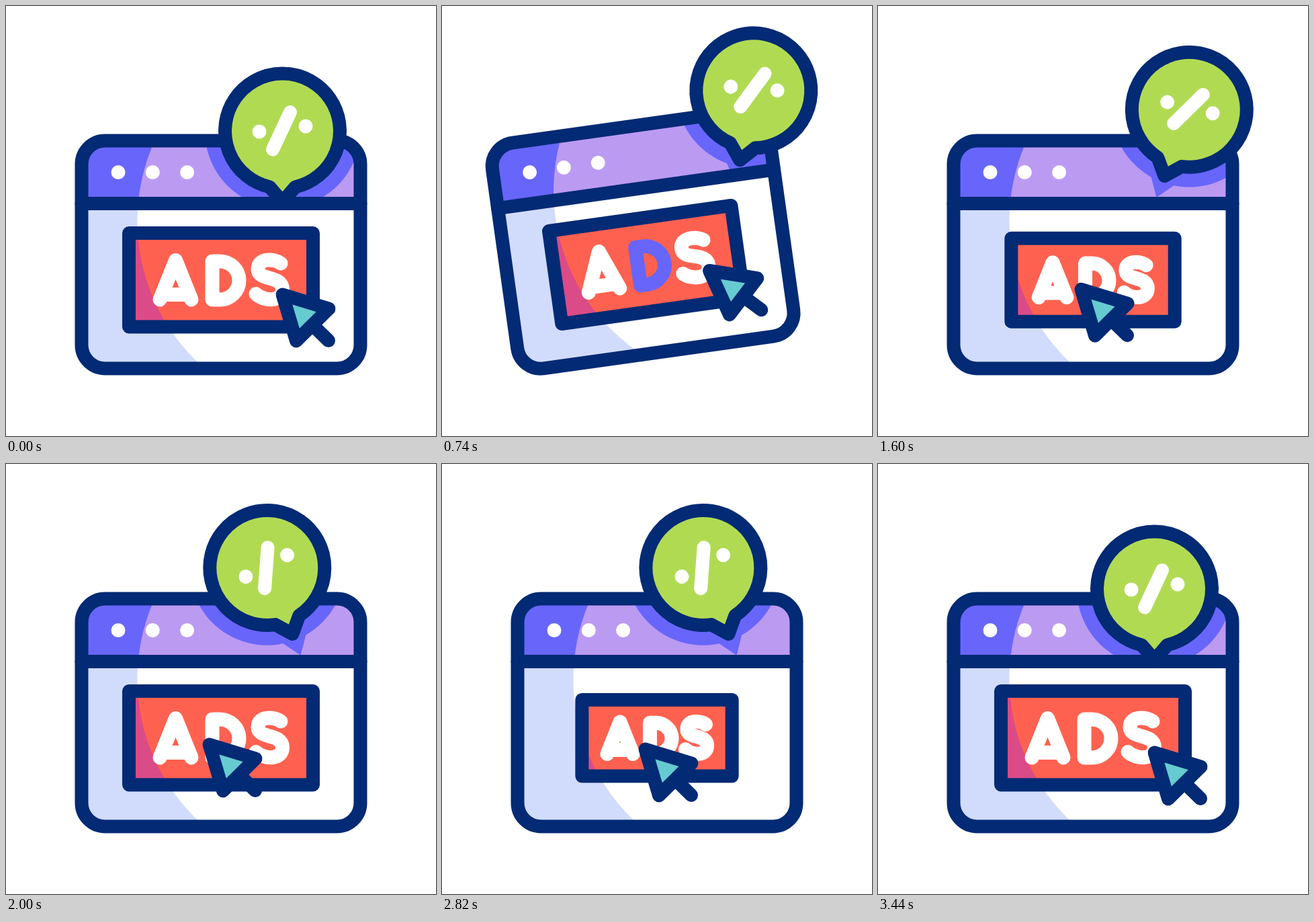
Write an HTML page with a canvas that moves like this. It is 640x640 px and loops after 3.6 s.

```html
<!DOCTYPE html>
<html lang="en">
<head>
<meta charset="utf-8">
<title>Ads window</title>
<style>
  html, body { margin: 0; width: 100%; height: 100%; overflow: hidden; background: #fff; }
  canvas { display: block; width: 640px; height: 640px; }
</style>
</head>
<body>
<canvas id="stage" width="640" height="640"></canvas>
<script>
const ctx = document.getElementById('stage').getContext('2d');
const LOOP = 3600;
const NAVY = '#032a74', VIOLET = '#6865fa', LILAC = '#bb9af2', PALE = '#d1dcfd';
const RED = '#ff6150', PINK = '#db4b88', GREEN = '#b1da53', TEAL = '#66cbd0', WHITE = '#fff';

const rad = deg => deg * Math.PI / 180;
const clamp = (v, lo, hi) => Math.min(hi, Math.max(lo, v));

// Eased progress from 0 to 1 between two times
function step(t, from, to) {
  const k = clamp((t - from) / (to - from), 0, 1);
  return k * k * (3 - 2 * k);
}

// Repeated 0-1-0 wave that rests at 0 outside its span
function wave(t, from, period, count) {
  const k = clamp((t - from) / period, 0, count);
  return (1 - Math.cos(2 * Math.PI * k)) / 2;
}

const tilt = t => -13 * (step(t, 248, 620) - step(t, 620, 905));
const press = t => wave(t, 1444, 556, 3);

function bubblePose(t) {
  const rise = step(t, 200, 600), drop = step(t, 600, 1155), home = step(t, 2830, 3435);
  return {
    x: 411.5 + 35 * rise - 20.1 * drop - 14.9 * home,
    y: 291.5 - 66.7 * rise + 28.2 * drop + 38.5 * home,
    angle: 17.4 * rise - 38.3 * drop + 41.6 * wave(t, 1165, 833, 2) + 20.9 * home
  };
}

function cursorShift(t) {
  return {
    x: -109 * (step(t, 980, 1410) - step(t, 3000, 3435)),
    y: -12 * (step(t, 1222, 1444) - step(t, 3111, 3400)) + 7 * press(t)
  };
}

const LETTERS = [
  'M229 437L252.5 378.5L276 437M234 429.5H271',
  'M307 380H318A29 28.5 0 0 1 318 437H307Z',
  'M409 383C400 376 375 374 375 391.5C375 410 411.5 400 411.5 422C411.5 441 384 440 372 428.5'
].map(d => new Path2D(d));
const FRAME = new Path2D();
FRAME.roundRect(112.5, 200.5, 415, 339, 35);
const BAR = new Path2D('M100 190H540V294H100Z');
const DIVIDER = new Path2D('M112.5 294H527.5');
const BANNER = new Path2D('M183 338H457V477.5H183Z');
const ARROW = new Path2D('M411.5 429.5L480.5 450.5L432 498.5Z');
const HANDLE = new Path2D('M456 474.5L480 498');
const BUBBLE = new Path2D('M-19 83.4L0 105.5L19 83.4A85.5 85.5 0 1 0 -19 83.4Z');
const SHADOW = new Path2D('M-18 114L0 139.5L18 114A115.5 115.5 0 1 0 -18 114Z');
const SLASH = new Path2D('M-14.5 27.5L11.5 -28');
const LIGHT = new Path2D();
LIGHT.arc(486.5, 320, 291, 0, 7);

function fill(path, color) {
  ctx.fillStyle = color;
  ctx.fill(path);
}

function stroke(path, color = NAVY, width = 20) {
  ctx.strokeStyle = color;
  ctx.lineWidth = width;
  ctx.stroke(path);
}

function dot(x, y) {
  const disc = new Path2D();
  disc.arc(x, y, 10.5, 0, 7);
  fill(disc, WHITE);
}

function group(draw) {
  ctx.save();
  draw();
  ctx.restore();
}

// Two tones: dark everywhere, light inside the big circle
function shade(clip, dark, light) {
  ctx.clip(clip);
  fill(clip, dark);
  fill(LIGHT, light);
}

// Scales the path about the banner's centre but keeps line widths
function scaled(path, s) {
  const out = new Path2D();
  out.addPath(path, new DOMMatrix([s, 0, 0, s, 320 * (1 - s), 407.75 * (1 - s)]));
  return out;
}

function placeBubble(t) {
  const { x, y, angle } = bubblePose(t);
  ctx.translate(x, y);
  ctx.rotate(rad(angle));
  ctx.translate(0, -105.5);
}

function drawHeader(t) {
  group(() => {
    ctx.clip(FRAME);
    shade(BAR, VIOLET, LILAC);
    ctx.resetTransform();
    placeBubble(t);
    fill(SHADOW, VIOLET);
  });
  for (let i = 0; i < 3; i++) dot(167 + 51.3 * i, 247.5);
}

function drawBanner(t) {
  const s = 1 - 0.186 * press(t);
  const box = scaled(BANNER, s);
  group(() => shade(box, PINK, RED));
  stroke(box);
  const lit = Math.floor((t - 200) / 400);
  LETTERS.forEach((path, i) => stroke(scaled(path, s), i === lit ? VIOLET : WHITE, 21));
}

function drawCursor(t) {
  const { x, y } = cursorShift(t);
  ctx.translate(x, y);
  stroke(HANDLE);
  fill(ARROW, TEAL);
  stroke(ARROW);
}

function drawWindow(t) {
  ctx.translate(149, 509);
  ctx.rotate(rad(tilt(t)));
  ctx.translate(-149, -509);
  group(() => shade(FRAME, PALE, WHITE));
  drawHeader(t);
  stroke(DIVIDER);
  stroke(FRAME);
  drawBanner(t);
  drawCursor(t);
}

function drawBubble(t) {
  placeBubble(t);
  fill(BUBBLE, GREEN);
  stroke(BUBBLE);
  stroke(SLASH, WHITE);
  dot(-34.5, 1);
  dot(34.5, -7);
}

function render(t) {
  ctx.resetTransform();
  ctx.fillStyle = WHITE;
  ctx.fillRect(0, 0, 640, 640);
  ctx.lineCap = ctx.lineJoin = 'round';
  group(() => drawWindow(t));
  group(() => drawBubble(t));
}

const start = performance.now();
function tick() {
  render((performance.now() - start) % LOOP);
  requestAnimationFrame(tick);
}
tick();
</script>
</body>
</html>
```
